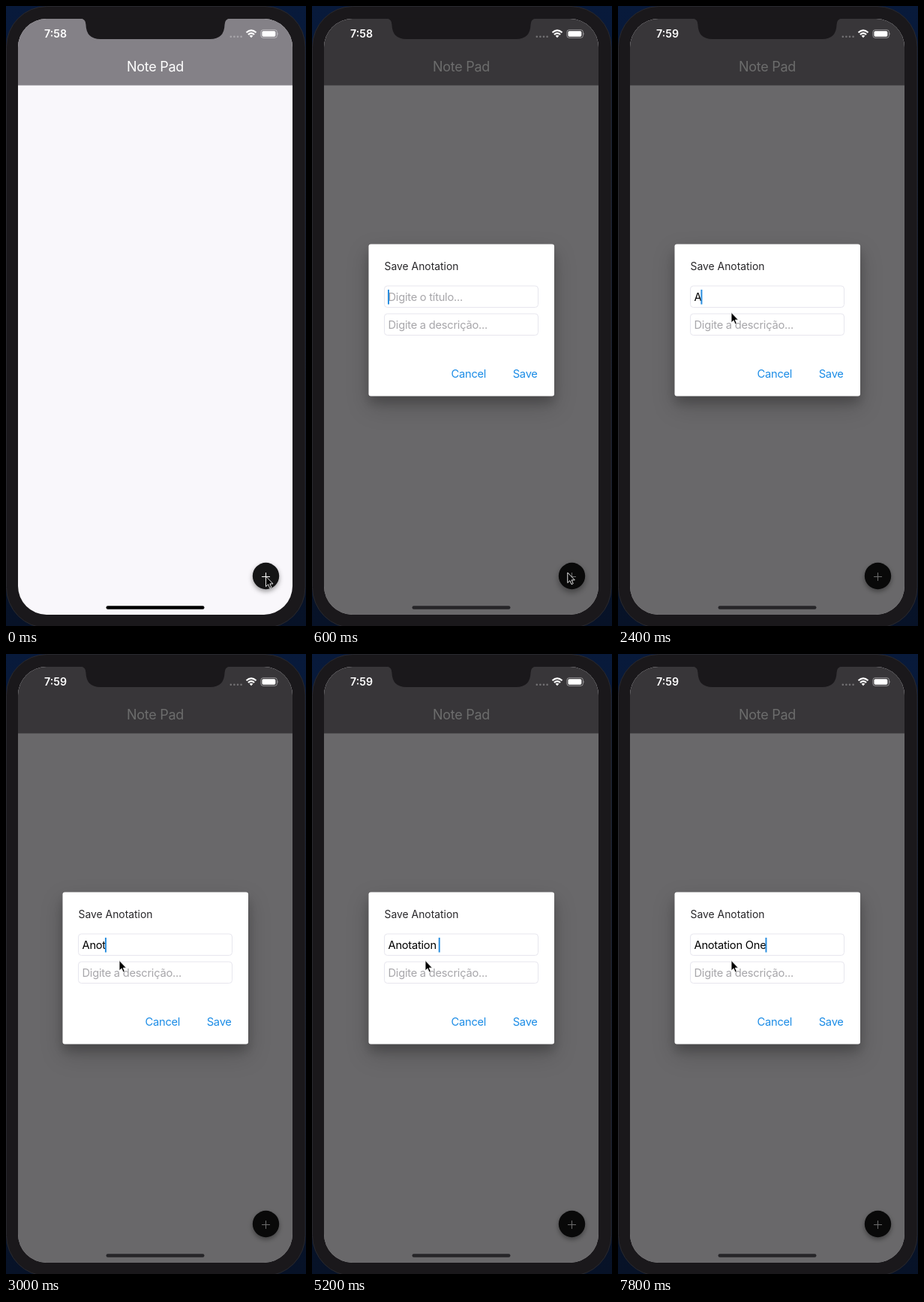
Write an HTML page that moves like this. It is 400 px wide and 824 px high and loops after 8 s.

```html
<!DOCTYPE html>
<html lang="pt">
<head>
<meta charset="utf-8">
<title>Note pad</title>
<style>
  html, body { margin: 0; width: 100%; height: 100%; overflow: hidden; background: #06142f; }
  svg { display: block; width: 400px; height: 824px; }
  text { font: 14.7px Inter, "Open Sans", sans-serif; letter-spacing: -.25px; white-space: pre; }
  #clock { font-size: 14.2px; font-weight: 600; letter-spacing: 0; fill: #fff; }
  .bar { font-size: 18px; letter-spacing: -.3px; fill: #fff; text-anchor: middle; }
  .title { font-size: 13.9px; letter-spacing: 0; fill: #28272a; }
  .hint { fill: #a7a6aa; }
  .link { fill: #1b8ce6; }
  .field { fill: #fff; stroke: #e7e6ee; }
  .card { fill: #fff; filter: drop-shadow(0 9px 7px rgba(0,0,0,.17)) drop-shadow(0 12px 14px rgba(0,0,0,.2)); }
</style>
</head>
<body>
<svg viewBox="0 0 400 824">
  <defs>
    <linearGradient id="desk" x2="0" y2="1">
      <stop offset="0" stop-color="#081a3b"/>
      <stop offset="1" stop-color="#071227"/>
    </linearGradient>
    <clipPath id="screen"><rect x="16" y="17" width="366" height="792" rx="38"/></clipPath>
  </defs>

  <rect width="400" height="824" fill="url(#desk)"/>
  <rect x=".5" y=".5" width="398.5" height="826" rx="54" fill="#1a181b" stroke="#29292f"/>

  <g clip-path="url(#screen)">
    <rect x="16" y="17" width="366" height="792" fill="#f9f7fb"/>
    <rect x="16" y="17" width="366" height="88.5" fill="#848187"/>
    <text class="bar" x="199" y="87">Note Pad</text>
    <circle id="fab" cx="346.5" cy="757.5" r="17.7"/>
    <path d="M341 758.5h11M346.5 753v11" stroke="#fff"/>
    <rect id="shade" x="16" y="17" width="366" height="792" fill-opacity=".575"/>
  </g>

  <path d="M99 16.5Q106.500 17 106.500 25Q107 44 126 44H272Q291 44 291.500 25Q291.500 17 299 16.500Z" fill="#1a181b"/>
  <text id="clock" x="51" y="42.3"></text>
  <g fill="#fff">
    <path d="M299.800 40.700h15" stroke="#fff" stroke-width="2.6" stroke-linecap="round"
          stroke-dasharray="0 4.600" opacity=".3"/>
    <g fill="none" stroke="#fff" stroke-width="2.1">
      <path d="M320.500 35.300Q327 29.300 333.500 35.300"/>
      <path d="M322.900 38Q327 34.200 331.100 38"/>
    </g>
    <path d="M324.600 39.600Q327 37.700 329.400 39.600L327 42.200Z"/>
    <rect x="339.900" y="31.700" width="21.500" height="10.600" rx="3" fill="none" stroke="#fff" opacity=".45"/>
    <rect x="341.400" y="33.200" width="18" height="7.600" rx="1.800"/>
    <path d="M362.400 35.300q1.400 1.700 0 3.400z" opacity=".5"/>
  </g>
  <rect id="home" x="133.500" y="797.300" width="131" height="4.500" rx="2.250"/>

  <g id="dialog">
    <rect class="card" x="75.500" y="316.500" width="247.500" height="202" rx="3"/>
    <text class="title" x="96.500" y="351">Save Anotation</text>
    <rect class="field" x="96.500" y="372" width="205" height="28.500" rx="4"/>
    <rect class="field" x="96.500" y="409" width="205" height="28.500" rx="4"/>
    <text class="hint" id="hint" x="101.500" y="391.700">Digite o título...</text>
    <text id="typed" x="101.500" y="391.700"></text>
    <rect id="caret" y="377" width="2" height="19.500" fill="#2b8fe0"/>
    <text class="hint" x="101.500" y="428.700">Digite a descrição...</text>
    <text class="link" x="185.500" y="494">Cancel</text>
    <text class="link" x="267.700" y="494">Save</text>
  </g>

  <path id="mouse" d="M0 0V13.600L3.100 10.700L5.200 15.600L7.400 14.600L5.300 9.900H9.500Z" stroke="#fff" stroke-width=".9"/>
</svg>
<script>
const $ = id => document.getElementById(id);
const LOOP = 8000, TICK = 200, NOTE = "Anotation One";
// Typing bursts: start time, letters before, letters after
const bursts = [[2400, 0, 4], [3400, 4, 9], [5200, 9, 10], [6000, 10, 13]];
const caretOff = [[1600, 2000], [4800, 5000], [6800, 7600]];
const clamp = (v, a, b) => Math.min(b, Math.max(a, v));
const mix = (a, b, k) => a + (b - a) * k;

function letters(t) {
  let n = 0;
  for (const [start, from, to] of bursts)
    if (t >= start) n = Math.min(to, from + 1 + Math.floor((t - start) / TICK));
  return n;
}

function mouseAt(t) {
  if (t < 600) return [346.5, 758];
  const k = clamp((t - 600) / 600, 0, 1), e = k * k * (3 - 2 * k);
  const rest = t < 1400 ? .6 : 0;
  return [mix(340.8, 151 + rest, e), mix(753, 407.3 + rest, e)];
}

function draw(t) {
  const open = t >= 600;
  const press = open ? clamp((1200 - t) / 1200, 0, .5) : clamp(t / 400, 0, 1);
  const tone = Math.round(mix(21, 40, open ? 0 : press));
  $("fab").style.fill = `rgb(${tone},${tone},${tone + 1})`;
  $("fab").style.filter = `drop-shadow(0 ${mix(3, 6, press)}px ${mix(3, 5, press)}px rgba(0,0,0,.38))`;
  $("shade").style.display = $("dialog").style.display = open ? "" : "none";
  $("home").style.fill = open ? "#262528" : "#000";
  $("clock").textContent = t < 1400 ? "7:58" : "7:59";

  const n = letters(t);
  $("typed").textContent = NOTE.slice(0, n);
  $("hint").style.display = n ? "none" : "";
  const width = n && open ? $("typed").getComputedTextLength() : 0;
  $("caret").setAttribute("x", 101 + width - (n ? .5 : 0));
  const hidden = caretOff.some(([a, b]) => t >= a && t < b);
  const fading = t >= 7600 && t < 7800;
  $("caret").style.opacity = hidden ? 0 : fading ? .6 : 1;
  $("mouse").setAttribute("transform", `translate(${mouseAt(t)})`);
}

function frame() {
  const t = performance.now() % LOOP;
  draw(Math.floor(t / TICK) * TICK);
  requestAnimationFrame(frame);
}
frame();
</script>
</body>
</html>
```
